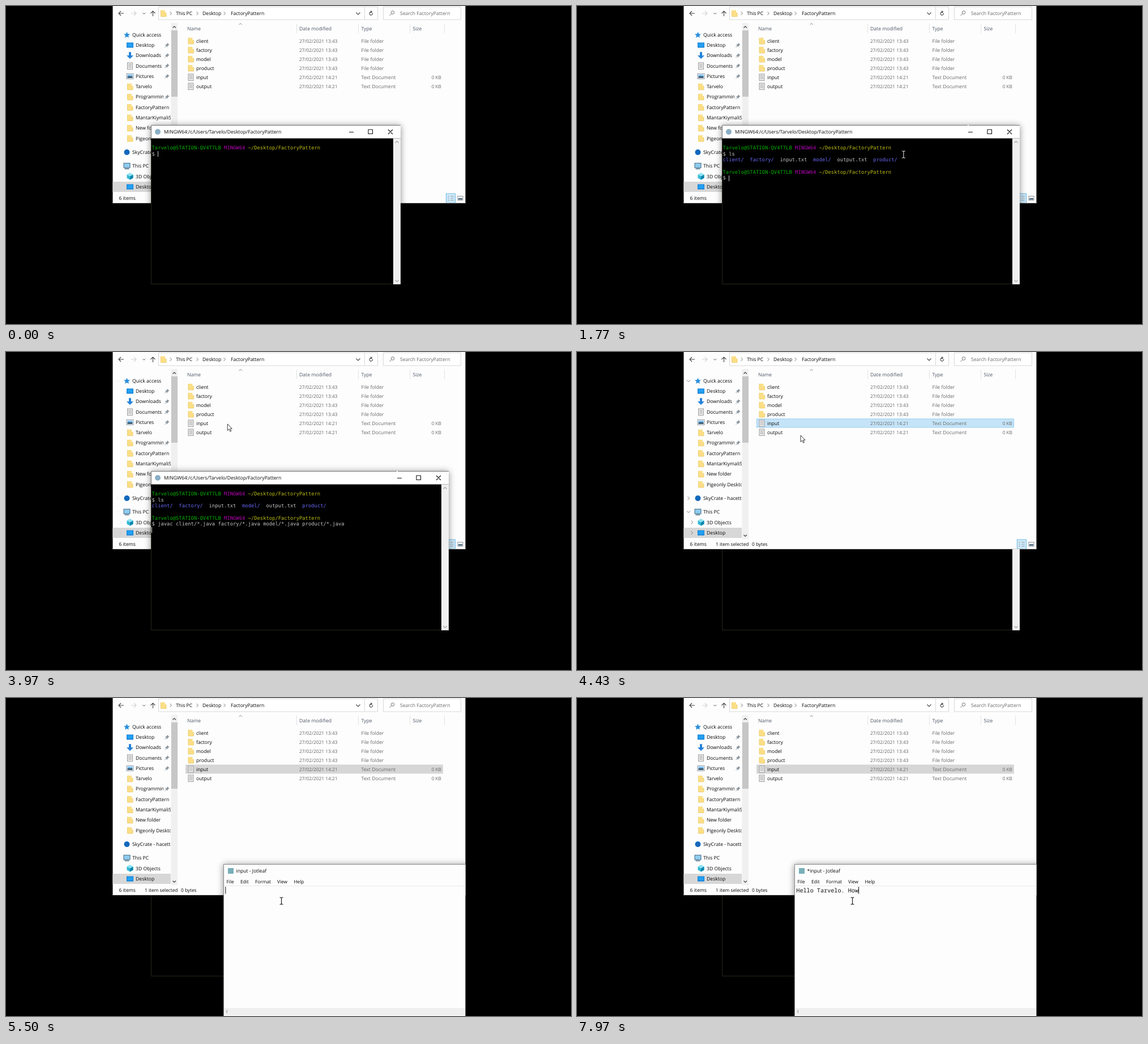
Write an HTML page that moves like this. It is 998 px wide and 561 px high and loops after 8000 ms.

```html
<!DOCTYPE html>
<html lang="en">
<head>
<meta charset="utf-8">
<title>Compile and edit</title>
<style>
  html, body { margin: 0; width: 100%; height: 100%; overflow: hidden; background: #000; }
  svg { display: block; width: 998px; height: 561px; }
  text { font: 8.65px "Open Sans", "Noto Sans", sans-serif; fill: #080808; white-space: pre; text-rendering: geometricPrecision; }
  .dim { fill: #686868; }
  .head { fill: #4c5664; }
  .small { font-size: 8.3px; }
  .term { font: 8.84px "DejaVu Sans Mono", monospace; fill: #c4c4c4; }
  .note { font: 10.17px "Noto Sans Mono", "DejaVu Sans Mono", monospace; fill: #111; }
  .line { fill: none; stroke: #555; }
  .shadow { filter: drop-shadow(0 1px 6px rgba(0, 0, 0, .45)); }
</style>
</head>
<body>
<svg id="stage" viewBox="0 0 998 561">
  <defs>
    <clipPath id="screen"><rect x="188.500" width="623" height="561"/></clipPath>
    <clipPath id="nav"><rect x="188.500" width="102.500" height="348"/></clipPath>
    <clipPath id="pinned"><rect x="188.500" width="90" height="348"/></clipPath>
  </defs>
  <g id="windows">
    <g id="explorer"></g>
    <g id="terminal" class="shadow"></g>
  </g>
  <g clip-path="url(#screen)"><g id="editor" class="shadow"></g></g>
  <g id="beam"><path d="M-3-6h2l1 1 1-1h2M0-5V5M-3 6h2l1-1 1 1h2" fill="none" stroke-width="1.1"/></g>
  <g id="arrow">
    <path d="M0 0V11.5L2.7 9 4.6 13.3 6.5 12.5 4.7 8.3H8Z" fill="#fff" stroke="#222" stroke-width=".9"/>
    <circle id="busy" cx="10" cy="1" r="4.4" fill="#eef8ff" stroke="#2391e4" stroke-width="3.2"/>
  </g>
</svg>
<script>
const LOOP = 8000;
const USER = "Tarvelo";
const HOST = "STATION-QV4T7LB";
const FOLDER = "FactoryPattern";
const $ = id => document.getElementById(id);

const text = (x, y, s, cls = "", extra = "") => `<text x="${x}" y="${y + 3}" class="${cls}" ${extra}>${s}</text>`;
const rect = (x, y, w, h, fill, extra = "") => `<rect x="${x}" y="${y}" width="${w}" height="${h}" fill="${fill}" ${extra}/>`;
const line = (d, color = "#555", w = 1) => `<path d="${d}" class="line" style="stroke:${color};stroke-width:${w}"/>`;
const at = (x, y, s) => `<g transform="translate(${x} ${y})">${s}</g>`;

// Small icons, drawn around their own centre
const icons = {
  folder: '<path d="M-4.500-5.500H3V-1H5V5.500H-4.500Z" fill="#fbdf86"/>' + line("M-4.500-5.500V5.500H5V-1H3", "#ecc662", .8),
  doc: rect(-4.5, -5.5, 9, 11.5, "#f4f4f4", 'stroke="#8f8f8f" stroke-width=".9"') + line("M-3-3H3M-3-1H3M-3 1H3M-3 3H3", "#999", .8),
  screen: rect(-6, -4.5, 12, 9, "#0c7cd5") + rect(-5, -3.5, 10, 6.5, "#22a0f2"),
  down: '<path d="M-2-6H2V0H6L0 6-6 0H-2Z" fill="#2583d8"/>',
  picture: rect(-6, -4.5, 12, 9, "#fff", 'stroke="#8b98a3"') + rect(-4.5, -3, 9, 3, "#79bdf0") + rect(-4.5, 0, 9, 3, "#35566e"),
  star: '<path d="M0-5.5 1.6-1.8 5.5-1.5 2.5 1.2 3.5 5 0 3-3.5 5-2.5 1.2-5.5-1.5-1.6-1.8Z" fill="#2a8fdd"/>',
  cloud: '<circle r="5" fill="#1268bd"/>',
  pc: rect(-5.5, -5, 11, 8, "#8fcdf0", 'stroke="#40677f"') + line("M-4 5H4", "#40677f", 1.4),
  cube: '<path d="M0-6 5.5-3V3L0 6-5.5 3V-3Z" fill="#35b8d6"/><path d="M0 0 5.5-3V3L0 6Z" fill="#0d86ad"/><path d="M0-6 5.5-3 0 0-5.5-3Z" fill="#8de3f2"/>'
};
const pin = '<path d="M.5-4 4-.5 2.500 0 1 1.500 .5 3.500-3.500-.5-1.500-1 0-2.500Z" fill="#8c969e"/>' + line("M-1.500 1.500-4 4", "#8c969e");
const chevron = (x, y, open) => line(open ? `M${x - 3} ${y - 1.5}l3 3 3-3` : `M${x - 1.5} ${y - 3}l3 3-3 3`, "#777");

function buildExplorer() {
  const navRows = [
    ["star", 51, "Quick access", 0], ["screen", 69, "Desktop", 1, 1], ["down", 87.3, "Downloads", 1, 1],
    ["doc", 105.5, "Documents", 1, 1], ["picture", 124, "Pictures", 1, 1], ["folder", 142.3, USER, 1],
    ["folder", 160.3, "Programming", 1, 1], ["folder", 178.6, FOLDER, 1], ["folder", 197, "MantarKiymaliSos", 1],
    ["folder", 215.3, "New folder", 1], ["folder", 233.5, "Pigeonly Desktop", 1],
    ["cloud", 258, "SkyCrate - hacettepe", 0], ["pc", 282.2, "This PC", 0], ["cube", 300.5, "3D Objects", 1], ["screen", 319, "Desktop", 1]
  ];
  const files = [["client"], ["factory"], ["model"], ["product"], ["input", 1], ["output", 1]];
  const frame = 'stroke="#d9d9d9"';

  let s = rect(188.5, 0, 623, 348, "#fdfdfd");
  // Address bar
  s += line("M208 13H199.500M203 9 199 13 203 17", "#444", 1.1) + line("M221 13H229.500M226 9 230 13 226 17", "#d2d2d2", 1.1);
  s += line("M241.500 12l2.300 2.300 2.300-2.300", "#555") + line("M259.500 18V9M255.500 13l4-4 4 4", "#444", 1.1);
  s += rect(269.5, 1.5, 387, 22.5, "#fff", frame) + line("M633.500 2V24", "#d9d9d9");
  s += rect(666.5, 1.5, 137, 22.5, "#fff", frame) + at(278, 13, icons.folder);
  s += [291, 338, 386].map(x => chevron(x, 13)).join("");
  s += text(300, 13, "This PC") + text(347, 13, "Desktop") + text(397, 13, FOLDER);
  s += line("M618.500 11.500l3.500 3.500 3.500-3.500", "#444", 1.1) + line("M647.500 12.500A2.800 2.800 0 1 1 645 10.500M644 8.500 646.500 10.500 644 12.300", "#444", 1.1);
  s += `<circle cx="683" cy="11.500" r="2.800" class="line" style="stroke:#777"/>` + line("M681 13.500 677.500 17", "#777");
  s += text(696, 13, "Search " + FOLDER, "dim");
  // Navigation pane
  s += rect(188.5, 310, 102.5, 18, "#d7d7d7") + '<g clip-path="url(#nav)">';
  for (const [icon, y, label, level, pinned] of navRows) {
    s += at(level ? 219 : 213.5, y, icons[icon]);
    s += text(level ? 229 : 223, y, label, "", pinned ? 'clip-path="url(#pinned)"' : "");
    if (pinned) s += at(284.5, y, pin);
  }
  s += '</g><g id="chevrons">' + chevron(197, 51, 1) + chevron(197, 258) + chevron(197, 282, 1) + chevron(203, 300.5) + chevron(203, 319) + "</g>";
  s += rect(291.5, 30, 11.5, 300, "#f0f0f0") + rect(292, 43, 11, 117, "#c6c6c6");
  s += line("M294.500 38.500l2.700-2.700 2.700 2.700M294.500 322.500l2.700 2.700 2.700-2.700", "#444", 1.3);
  // File list
  s += line("M513.500 31V48M622.500 31V48M713.500 31V48M774.500 31V48", "#e3e3e3") + line("M411.500 33l2.700-2.500 2.700 2.500", "#888");
  s += text(320, 39.5, "Name", "head") + text(518, 39.5, "Date modified", "head") + text(627.5, 39.5, "Type", "head") + text(718.5, 39.5, "Size", "head");
  s += '<rect id="pick" x="317.500" y="118" width="454" height="15"/>';
  files.forEach(([name, isText], i) => {
    const y = 61.5 + i * 16;
    s += at(326.5, y, icons[isText ? "doc" : "folder"]) + text(336, y, name);
    s += text(518, y, "27/02/2021 " + (isText ? "14:21" : "13:43"), "dim small");
    s += text(627.5, y, isText ? "Text Document" : "File folder", "dim");
    if (isText) s += text(769, y, "0 KB", "dim small", 'text-anchor="end"');
  });
  // Status bar
  s += text(199.5, 339.3, "6 items") + '<g id="picked">' + text(245, 339.3, "1 item selected", "small") + text(309, 339.3, "0 bytes", "small") + "</g>";
  s += rect(777.5, 331, 16, 16, "#d3ecfa", 'stroke="#66b7e0"');
  s += line("M780 335.500h3M780 339h3M780 342.500h3M785 335.500h6M785 339h6M785 342.500h6", "#7d929f", .9);
  s += rect(798, 335.5, 9, 7, "#fff", 'stroke="#7c8891" stroke-width=".9"') + rect(799, 339, 7, 2.5, "#4a677c") + line("M188.500 347.500H811.500", "#c9c9c9");
  $("explorer").innerHTML = s;
}

const ROW = 10.65, COL = 5.32, LEFT = 257.5;
const span = (color, s) => `<tspan fill="${color}">${s}</tspan>`;
const prompt = span("#00b400", `${USER}@${HOST} `) + span("#b400b4", "MINGW64 ") + span("#bcbc14", "~/Desktop/" + FOLDER);
const dir = s => span("#6868f4", s);
const listing = [dir("client/"), dir("factory/"), "input.txt", dir("model/"), "output.txt", dir("product/")].join("  ");
const compile = "javac " + ["client", "factory", "model", "product"].map(d => d + "/*.java").join(" ");

function buildTerminal() {
  const row = (i, s, id) => text(LEFT, 250 + i * ROW, s, "term", id ? `id="${id}"` : "");
  $("terminal").innerHTML =
    '<rect id="frame" x="256.500" y="210.500" height="280" fill="#000" stroke="#26261c"/>' +
    '<rect id="bar" x="256" y="210" height="23.500" fill="#fff"/>' + line("M256.500 233.500V210.500H690", "#777") +
    '<circle cx="268" cy="222" r="5" fill="#8aaec4"/>' + text(279, 222, `MINGW64:/c/Users/${USER}/Desktop/${FOLDER}`) +
    '<g id="edge">' + line("M-90 210.500H0", "#777") + line("M-91 222.500h8M-57 218h7.500v7.500h-7.500zM-22 218l8 8M-14 218l-8 8", "#111", 1.1) +
    rect(-13, 233.5, 13, 257.5, "#f0f0f0") + line("M-9.500 241.500l3-3 3 3M-9.500 483.500l3 3 3-3", "#a5a5a5", 1.2) + "</g>" +
    row(0, prompt) + row(1, "$", "first") + row(2, listing, "list") + row(4, prompt, "again") + row(5, "$", "second") +
    '<rect id="caret" width="1" height="10" fill="#c8c8c8"/>';
}

function buildEditor() {
  const menu = [["File", 389.5], ["Edit", 414], ["Format", 440], ["View", 479], ["Help", 508.5]];
  $("editor").innerHTML =
    rect(384.5, 293.5, 590, 330, "#fdfdfd", 'stroke="#8c8c8c"') + line("M385 331.500H975", "#e9e9e9") +
    rect(392, 300, 10, 10, "#78afb9") + text(406.5, 305, "", "", 'id="title"') +
    menu.map(([s, x]) => text(x, 324, s, "small")).join("") +
    rect(385, 547, 590, 13, "#efefef") + line("M391.500 550.500l-2.500 2.500 2.500 2.500", "#aaa", 1.2) +
    text(387.3, 339.5, "", "note", 'id="words"') + '<rect id="point" y="333" width="1" height="12.500" fill="#111"/>';
}

// Mouse way points: time, x, y
const path = [[330, 770, 300], [430, 645, 272], [530, 579.5, 262], [830, 577, 262], [3400, 576.5, 262], [4000, 390, 126],
  [4370, 390, 126], [4430, 395, 147], [4830, 457, 208], [5060, 457, 208], [5350, 480, 345], [5480, 486.5, 358]];
const smooth = k => k * k * (3 - 2 * k);
const clamp = k => Math.max(0, Math.min(1, k));
const ramp = (t, from, to) => clamp((t - from) / (to - from));

function mouseAt(t) {
  const i = path.findIndex(p => p[0] > t);
  if (i < 0) return path[path.length - 1].slice(1);
  if (i === 0) return path[0].slice(1);
  const [t0, x0, y0] = path[i - 1], [t1, x1, y1] = path[i];
  const k = smooth((t - t0) / (t1 - t0));
  return [x0 + (x1 - x0) * k, y0 + (y1 - y0) * k];
}

const show = (id, on) => { $(id).style.display = on ? "" : "none"; };
const move = (id, x, y) => $(id).setAttribute("transform", `translate(${x} ${y})`);
const put = (id, s) => { if ($(id).textContent !== s) $(id).textContent = s; };
const set = (id, attrs) => { for (const k in attrs) $(id).setAttribute(k, attrs[k]); };

function drawTerminal(t) {
  const right = Math.round(697 + 85 * smooth(ramp(t, 20, 360)));
  set("frame", { width: right - 257 });
  set("bar", { width: right - 256 });
  move("edge", right, 0);

  const first = t < 870 ? "" : t < 930 ? "l" : "ls";
  const second = t < 2430 ? "" : t < 2770 ? "ls" : compile;
  put("first", "$ " + first);
  put("second", "$ " + second);
  show("list", t >= 1300);
  show("again", t >= 1500);
  show("second", t >= 1500);

  let row = 1, col = 2 + first.length;
  if (t >= 1230) [row, col] = [t < 1300 ? 2 : 3, 0];
  if (t >= 1500) [row, col] = [5, 2 + second.length];
  if (t >= 3050) [row, col] = [6, 0];
  set("caret", { x: Math.floor(LEFT + col * COL), y: Math.round(245.3 + row * ROW) });
  show("caret", !(t >= 2230 && t < 2430));
}

function drawEditor(t) {
  const open = t >= 4960;
  show("editor", open);
  if (!open) return;
  const scale = 1 - .1 * Math.pow(1 - ramp(t, 4950, 5150), 4.5);
  set("editor", {
    opacity: ramp(t, 4950, 5050),
    transform: `translate(680 420) scale(${scale}) translate(-680 -420)`
  });
  const message = `Hello ${USER}. How`;
  const count = t < 6670 ? 0 : t < 7400 ? Math.min(13, 1 + Math.floor((t - 6670) / 54)) : Math.min(18, 13 + Math.floor((t - 7370) / 116));
  put("words", message.slice(0, count));
  put("title", (count ? "*" : "") + "input - Jotleaf");
  set("point", { x: 387.3 + count * 6.1 });
  show("point", t < 5870 || t >= 6400);
}

function drawMouse(t) {
  const [x, y] = mouseAt(t);
  const raised = t >= 4000;
  const overTerm = !raised && y > 234;
  const overEditor = t > 5050 && x > 385 && y > 331;
  const isBeam = overTerm || overEditor;
  show("beam", isBeam && t >= 380);
  show("arrow", !isBeam);
  move(isBeam ? "beam" : "arrow", x, y);
  set("beam", { stroke: overEditor ? "#111" : "#ddd" });
  show("busy", t >= 4480 && t < 5200);
}

function draw(t) {
  const raised = t >= 4000;
  const top = $(raised ? "explorer" : "terminal");
  if ($("windows").lastElementChild !== top) $("windows").append(top);
  show("pick", raised);
  show("picked", raised);
  const active = t < 5100;
  set("pick", { fill: active ? "#c5e4f8" : "#d6d6d6", stroke: active ? "#96cdf0" : "#d6d6d6" });
  set("chevrons", { opacity: ramp(t, 3950, 4100) * (1 - ramp(t, 4500, 4800)) });
  drawTerminal(t);
  drawEditor(t);
  drawMouse(t);
}

buildExplorer();
buildTerminal();
buildEditor();
const start = performance.now();
function tick() {
  draw((performance.now() - start) % LOOP);
  requestAnimationFrame(tick);
}
tick();
</script>
</body>
</html>
```
